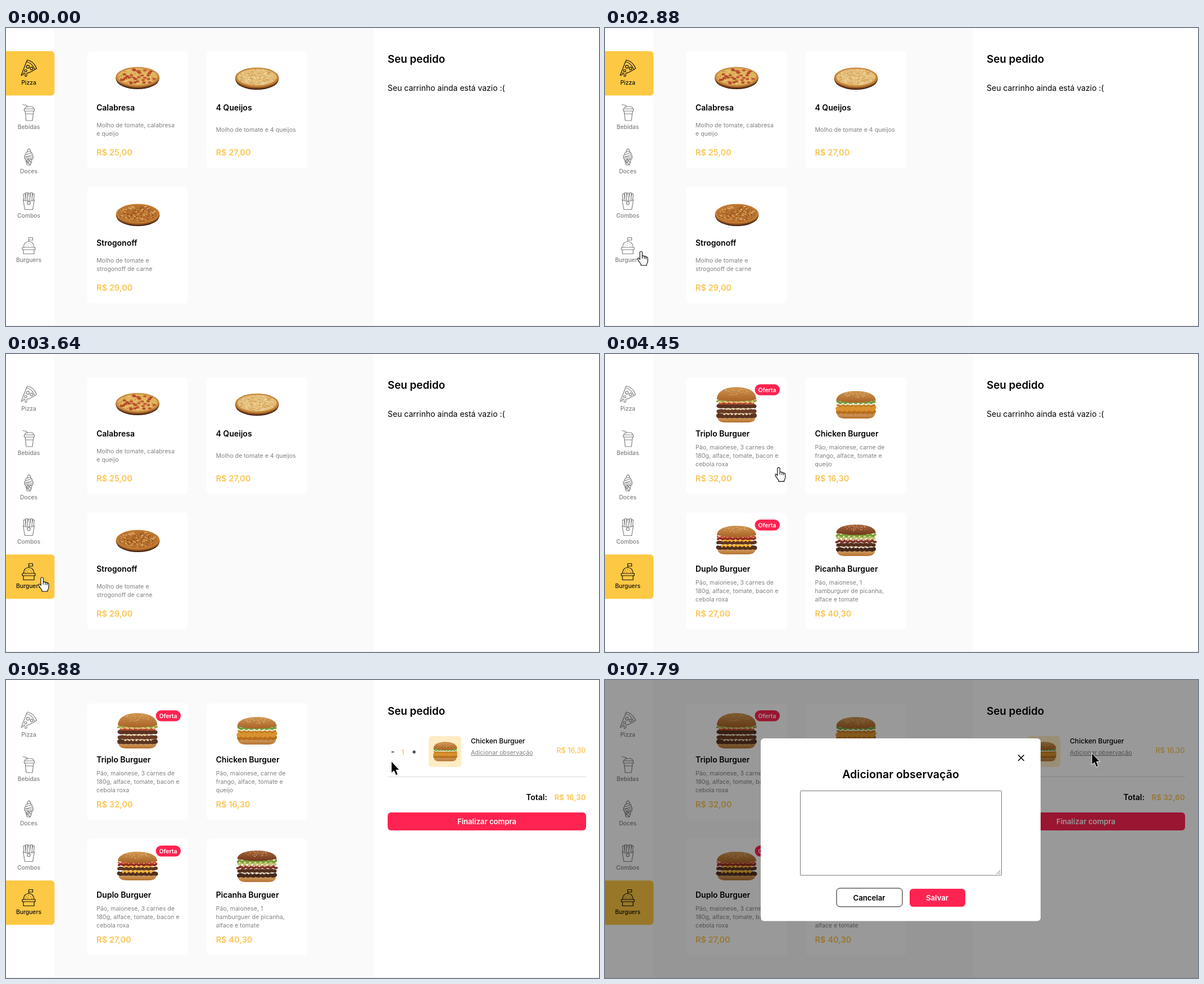
These frames come from a looping animation (1055 px wide and 531 px high, 8 s). An HTML page:

```html
<!DOCTYPE html>
<html lang="pt-BR">
<head>
<meta charset="utf-8">
<style>
html, body { margin: 0; width: 100%; height: 100%; overflow: hidden; background: #fff; }
svg { display: block; width: 1055px; height: 531px; font-family: Inter, "Open Sans", sans-serif; }
.icon { fill: none; stroke-width: 1.2; stroke-linejoin: round; stroke-linecap: round; }
</style>
</head>
<body>
<svg id="stage" viewBox="0 0 1055 531"></svg>
<script>
const YELLOW = '#fdc843', PRICE = '#fbc450', RED = '#ff2351', GREY = '#808080';
let seed = 7;
const rnd = () => (seed = seed * 16807 % 2147483647) / 2147483647;
const times = (n, fn) => Array.from({ length: n }, (_, i) => fn(i)).join('');
const group = (id, body) => `<g id="${id}">${body}</g>`;
const text = (x, y, s, size, weight = 400, fill = '#000', anchor = 'start', extra = '') =>
  `<text x="${x}" y="${y}" font-size="${size}" font-weight="${weight}" fill="${fill}" text-anchor="${anchor}" ${extra}>${s}</text>`;
const rect = (x, y, w, h, fill, r = 0, extra = '') =>
  `<rect x="${x}" y="${y}" width="${w}" height="${h}" rx="${r}" fill="${fill}" ${extra}/>`;
const oval = (x, y, rx, ry, fill) =>
  `<ellipse cx="${x.toFixed(1)}" cy="${y.toFixed(1)}" rx="${rx}" ry="${ry}" fill="${fill}"/>`;

// Scatter n ovals inside an ellipse
const scatter = (n, cx, cy, rx, ry, size, colors) => times(n, i => {
  const a = i * 2.4 + rnd() * 1.2, d = Math.sqrt((i + rnd()) / n);
  return oval(cx + rx * d * Math.cos(a), cy + ry * d * Math.sin(a), size, size * .6, colors[Math.floor(rnd() * colors.length)]);
});

const pizza = (cx, cy, crust, cheese, toppings) =>
  oval(cx, cy + 4.5, 38, 17.5, '#40200f') + oval(cx, cy + 2, 39, 18, '#8d5122') +
  oval(cx, cy, 38.5, 17.5, crust) + oval(cx, cy - .5, 35, 15, cheese) +
  toppings.map(([n, size, colors]) => scatter(n, cx, cy - .5, 33, 14, size, colors)).join('');

// layers: [color, y, thickness, waviness, half width]
const burger = (cx, top, brim, base, bun, layers) => {
  const wave = (y, amp, half) => 'M' + Array.from({ length: 25 }, (_, i) =>
    `${(cx - half + i * half / 12).toFixed(1)} ${(y + amp * Math.sin(i * 1.9 + y)).toFixed(1)}`).join('L');
  const h = brim - top;
  return `<path d="M${cx - 34} ${base - 11}Q${cx} ${base - 15} ${cx + 34} ${base - 11}Q${cx + 34} ${base} ${cx + 20} ${base}H${cx - 20}Q${cx - 34} ${base} ${cx - 34} ${base - 11}Z" fill="url(#heel)"/>` +
    layers.map(([c, y, w, amp, half]) =>
      `<path d="${wave(y, amp, half)}" fill="none" stroke="${c}" stroke-width="${w}" stroke-linecap="round" stroke-linejoin="round"/>`).join('') +
    `<path d="M${cx - 35} ${brim - 2}C${cx - 35} ${top + h * .3} ${cx - 20} ${top} ${cx} ${top}S${cx + 35} ${top + h * .3} ${cx + 35} ${brim - 2}Q${cx} ${brim + 5} ${cx - 35} ${brim - 2}Z" fill="url(#${bun})"/>` +
    scatter(26, cx, top + h * .36, 23, h * .28, .9, ['#f0d3a0', '#e3bb82']);
};

const triple = burger(234, 59, 83, 122, 'bun', [
  ['#5a3322', 110, 8, .5, 32], ['#f1dcb0', 106, 2.5, 1.8, 24], ['#6b3b26', 102, 7, .5, 32],
  ['#f1dcb0', 97, 2.5, 1.8, 23], ['#5a3322', 93, 7, .5, 32], ['#b8432a', 88, 3.5, .6, 30],
  ['#dfc06c', 85, 3, 1.8, 34], ['#8f9a3a', 83, 2.5, 1.6, 35]]);
const chicken = burger(446.5, 66, 85, 115, 'bun', [
  ['#b96f1d', 102, 9, 1.2, 31], ['#d9922f', 97, 8, 1.8, 32], ['#c07a22', 92, 3, 1.5, 33],
  ['#f3ead0', 89, 2.5, 1, 27], ['#6f9f3d', 86, 4, 1.5, 33]]);
const double = burger(234, 306, 325, 357, 'bun', [
  ['#52301f', 345, 7, .5, 33], ['#f3b22f', 341, 3, 2, 26], ['#5f3521', 336, 6, .5, 33],
  ['#f3b22f', 332, 2.5, 1.8, 26], ['#8f2a1a', 329, 4, 1, 33], ['#c2452a', 326, 2.5, 1.2, 34]]);
const steak = burger(446.5, 304, 321, 360, 'dark', [
  ['#45291c', 348, 7, .8, 32], ['#efe2c6', 344, 2, 1.6, 25], ['#54301f', 340, 6, .8, 32],
  ['#7d3427', 334, 4, 1.5, 35], ['#c9694a', 331, 1.5, 1.5, 31], ['#b9c46a', 327, 4, 1.8, 33], ['#7f9e36', 323, 4, 1.8, 34]]);

const card = (i, name, lines, price, art, offer) => {
  const x = i % 2 * 212.5, y = (i >> 1) * 241;
  return rect(144.5 + x, 41.5 + y, 179, 208, '#fff', 6) + art +
    text(161 + x, 146.5 + y, name, 14, 600) +
    lines.map((s, k) => text(161 + x, 184.5 + y + (k - (lines.length - 1) / 2) * 15, s, 10.6, 400, GREY)).join('') +
    text(161 + x, 227 + y, 'R$ ' + price, 14.6, 600, PRICE) +
    (offer ? rect(266.5, 54, 44.5, 19.5, RED, 9.75, `transform="translate(0 ${y})"`) +
      text(288.5, 67.5 + y, 'Oferta', 10.4, 600, '#fff', 'middle') : '');
};

const pizzas =
  card(0, 'Calabresa', ['Molho de tomate, calabresa', 'e queijo'], '25,00',
    pizza(234, 87, '#c98a40', '#e0b45c', [[50, 1.5, ['#efd084', '#c98238']], [30, 3.2, ['#b5482c', '#c4573a']]])) +
  card(1, '4 Queijos', ['Molho de tomate e 4 queijos'], '27,00',
    pizza(446.5, 88, '#c58437', '#e3bc78', [[80, 1.7, ['#f3dca6', '#d09a50', '#ead09a']]])) +
  card(2, 'Strogonoff', ['Molho de tomate e', 'strogonoff de carne'], '29,00',
    pizza(234.5, 331, '#c47d31', '#b8722f', [[140, 1.4, ['#8a4a1c', '#dba35a', '#a65c22', '#e6bd7c']]]));

const bread = ['Pão, maionese, 3 carnes de', '180g, alface, tomate, bacon e', 'cebola roxa'];
const burgers =
  card(0, 'Triplo Burguer', bread, '32,00', triple, true) +
  card(1, 'Chicken Burguer', ['Pão, maionese, carne de', 'frango, alface, tomate e', 'queijo'], '16,30', chicken) +
  card(2, 'Duplo Burguer', bread, '27,00', double, true) +
  card(3, 'Picanha Burguer', ['Pão, maionese, 1', 'hamburguer de picanha,', 'alface e tomate'], '40,30', steak);

const ring = (x, y, r) => `M${x - r} ${y}a${r} ${r} 0 1 0 ${2 * r} 0a${r} ${r} 0 1 0 ${-2 * r} 0`;
const menu = [
  ['Pizza', 'M38 57Q49 59 54.5 72L51.5 74Q46 62 36.5 60ZM36.5 60L27 84.5L31 83V81Q33 79 34 82V86Q36 87 37 85V81Q39 79 40.5 80L51.5 74' +
    ring(39, 69, 2.6) + ring(45.5, 72, 2.4) + ring(35, 76, 2)],
  ['Bebidas', 'M30 136.5L37 138L38 141M34 144Q34 140 38 140H45Q49 140 49 144ZM32.5 144H50.5V148H32.5ZM34 148L36 165H47L49 148M34.6 153H48.4'],
  ['Doces', 'M41 215Q37 217 38 221Q34 222 35 226Q32 227 33 230H48Q49 227 46.5 226Q47 222 44 221Q44 217 41 215ZM38 221L44 219M35 226L46 222M34 230L47 226' +
    'M33 230V233H48V230M34.5 233L37.5 244H43.5L46.5 233M35 235L43 244M38 233L45 240M37 241L45 233M36 238L41 233'],
  ['Combos', 'M30.5 306L33.5 323.5H47.5L50.5 306Q48 308 46 308H35Q33 308 30.5 306ZM32 306L31 296L34 295L35.5 307M35.5 303L35 293.5H38.5V307M38.5 301L40 294L43 294.5L42 307M43 301L44 293.5H47L46 307M46.8 300L48 295L50.5 296L49 306' +
    ring(40.5, 312, 2.7)],
  ['Burguers', 'M40.5 380V373.5H47.5V378H40.5M31 391Q32 380.5 40.5 380.5T50 391ZM29 391H52V395H29ZM31 395V402.5H50V395M36 386h.1M40 384h.1M44 386h.1M39 388h.1M46 389h.1M34 389h.1']
].map(([name, d], i) => `<g class="item"><path class="icon" d="${d}"/>` +
  text(40.5, 101 + 79 * i, name, 10.3, 500, 'inherit', 'middle') + '</g>').join('');

const cart = rect(752, 100, 58, 55, '#feecc4', 5) +
  `<g transform="translate(781.5 127.5) scale(.6 .7) translate(-446.5 -90.5)">${chicken}</g>` +
  text(688, 132, '-', 13, 600, '#000', 'middle') + text(726, 132, '+', 13, 600, '#000', 'middle') +
  text(706, 132.5, '1', 12, 500, PRICE, 'middle', 'id="qty"') +
  text(827, 113, 'Chicken Burguer', 12.1, 500) +
  text(827, 133, 'Adicionar observação', 10.7, 400, GREY, 'start', 'text-decoration="underline"') +
  text(1031.5, 129.5, 'R$ 16,30', 12.6, 500, PRICE, 'end') +
  rect(679, 172, 353, 1, '#d8d8d8') +
  text(963, 214, 'Total:', 14, 600, '#000', 'end', 'id="label"') +
  text(1031.5, 214, '', 13.4, 600, PRICE, 'end', 'id="total"') +
  rect(679, 236, 353, 32, RED, 6) + text(855.5, 257, 'Finalizar compra', 13.1, 600, '#fff', 'middle');

const modal = rect(0, 0, 1055, 531, '#000', 0, 'opacity=".4"') + rect(277, 104, 498, 325.5, '#fff', 6) +
  '<path d="M735 133.5L745.5 144M745.5 133.5L735 144" stroke="#000" stroke-width="1.7"/>' +
  text(526, 175, 'Adicionar observação', 19.6, 600, '#000', 'middle') +
  rect(347.5, 197.5, 358, 150.5, '#fff', 1, 'stroke="#767676"') +
  '<path d="M696.5 346L703.5 339M700.5 346L703.5 343" stroke="#666"/>' +
  rect(412, 371, 117, 33, '#fff', 6, 'stroke="#111"') + text(470, 392.5, 'Cancelar', 13.2, 600, '#000', 'middle') +
  rect(542, 372, 99, 32, RED, 6) + text(591, 392.5, 'Salvar', 13.2, 600, '#fff', 'middle');

const loader = rect(0, 0, 1055, 531, '#797979', 0, 'opacity=".74"') +
  `<g fill="none" stroke="${YELLOW}" stroke-width="2"><circle cx="526.5" cy="267" r="19.7" opacity=".5"/>` +
  '<circle id="arc" cx="526.5" cy="267" r="19.7" pathLength="4" stroke-dasharray="1 3"/></g>';

const arrow = '<path d="M0 0V21L4.7 17L8 25L11.5 23.5L8.5 15.5H14.5Z" stroke="#fff" stroke-linejoin="round"/>';
const hand = '<path d="M-2 2.5Q0 -.5 2.3 2.5V9.5Q4.5 8 6 10Q8 9 9 11Q11.5 10.5 12 13V19Q11.5 22 10 24V26H0V24L-5.5 16Q-7 12.5 -4 13L-2 15.5ZM2.3 9.5V14M6 10V14.5M9 11V15" fill="#fff" stroke="#000" stroke-width="1.1" stroke-linejoin="round"/>';

const bunFill = (id, a, b) => `<linearGradient id="${id}" x2="0" y2="1"><stop stop-color="${a}"/><stop offset="1" stop-color="${b}"/></linearGradient>`;
stage.innerHTML = '<defs>' + bunFill('bun', '#d09650', '#a96226') + bunFill('dark', '#a8643a', '#70381b') + bunFill('heel', '#ddb078', '#b5722f') + '</defs>' +
  group('page',
    rect(86, 0, 568.5, 531, '#fafafa') + rect(-10, 0, 96.3, 79, YELLOW, 6, 'id="active"') + menu +
    group('pizzas', pizzas) + group('burgers', burgers) +
    text(679, 62, 'Seu pedido', 18.8, 600) +
    group('empty', text(679, 112, 'Seu carrinho ainda está vazio :(', 14)) +
    group('cart', cart) + rect(0, 530, 1055, 1, '#e9e9e9')) +
  group('loader', loader) + group('modal', modal) +
  group('cursor', group('arrow', arrow) + group('hand', hand));

// Pointer moves: start, end, steps, target, optional curve point
const moves = [
  [920, 1120, 4, 819, 478],
  [1470, 1670, 4, 468, 451],
  [1940, 2220, 5, 244, 423],
  [2480, 2880, 7, 64, 397],
  [3970, 4720, 11, 414, 178, 239, 186],
  [4920, 5340, 7, 423, 183],
  [5540, 6020, 8, 706, 143, 655, 146],
  [6240, 6650, 6, 727, 130],
  [7110, 7590, 8, 866, 130]
];
function pointer(t) {
  let x = 940, y = 531;
  for (const [t0, t1, n, tx, ty, cx = (x + tx) / 2, cy = (y + ty) / 2] of moves) {
    if (t < t0) break;
    const s = Math.min(1, (Math.floor((t - t0) / (t1 - t0) * (n - 1) + .1) + 1) / n);
    const e = s * s * (3 - 2 * s), bend = (a, c, b) => (1 - e) ** 2 * a + 2 * e * (1 - e) * c + e * e * b;
    x = bend(x, cx, tx);
    y = bend(y, cy, ty);
  }
  return [x, y];
}

const el = id => document.getElementById(id);
const show = (id, on) => el(id).style.display = on ? '' : 'none';
const items = document.querySelectorAll('.item');
const inBox = (x, y, l, t, r, b) => x >= l && x <= r && y >= t && y <= b;

function draw(t) {
  const picked = t >= 3150 ? 4 : 0, loading = t >= 3150 && t < 3640, burgersOn = t >= 3710;
  const filled = t >= 5270, two = t >= 6570, open = t >= 7790;
  const [x, y] = pointer(t);
  const onCard = [0, 1, 2, 3].slice(0, burgersOn ? 4 : 3).some(i => {
    const l = 144 + i % 2 * 212.5, top = 41 + (i >> 1) * 241;
    return inBox(x, y, l, top, l + 179, top + 208);
  });
  const onLink = filled && (inBox(x, y, 719, 118, 734, 139) || inBox(x, y, 827, 122, 938, 137));
  const clickable = !loading && !open && (onCard || onLink || inBox(x, y, 0, 41, 86, 436));

  el('active').setAttribute('y', 41.3 + picked * 79);
  items.forEach((g, i) => {
    g.setAttribute('fill', i === picked ? '#111' : GREY);
    g.setAttribute('stroke', i === picked ? '#111' : GREY);
    g.lastChild.setAttribute('stroke', 'none');
  });
  show('pizzas', !burgersOn);
  show('burgers', burgersOn);
  show('empty', !filled);
  show('cart', filled);
  show('loader', loading);
  show('modal', open);
  el('page').style.filter = loading ? 'blur(1.6px)' : 'none';
  const spin = -120 + Math.floor((t - 3150) / 70) * 25.2;
  el('arc').setAttribute('transform', `rotate(${spin} 526.5 267)`);
  el('qty').textContent = two ? 2 : 1;
  el('total').textContent = two ? 'R$ 32,60' : 'R$ 16,30';
  el('label').setAttribute('x', two ? 960 : 963);
  show('cursor', t >= 920);
  show('hand', clickable);
  show('arrow', !clickable);
  el('cursor').setAttribute('transform', `translate(${x.toFixed(1)} ${y.toFixed(1)})`);
}

const start = performance.now();
function tick() {
  draw((performance.now() - start) % 8000);
  requestAnimationFrame(tick);
}
tick();
</script>
</body>
</html>
```
